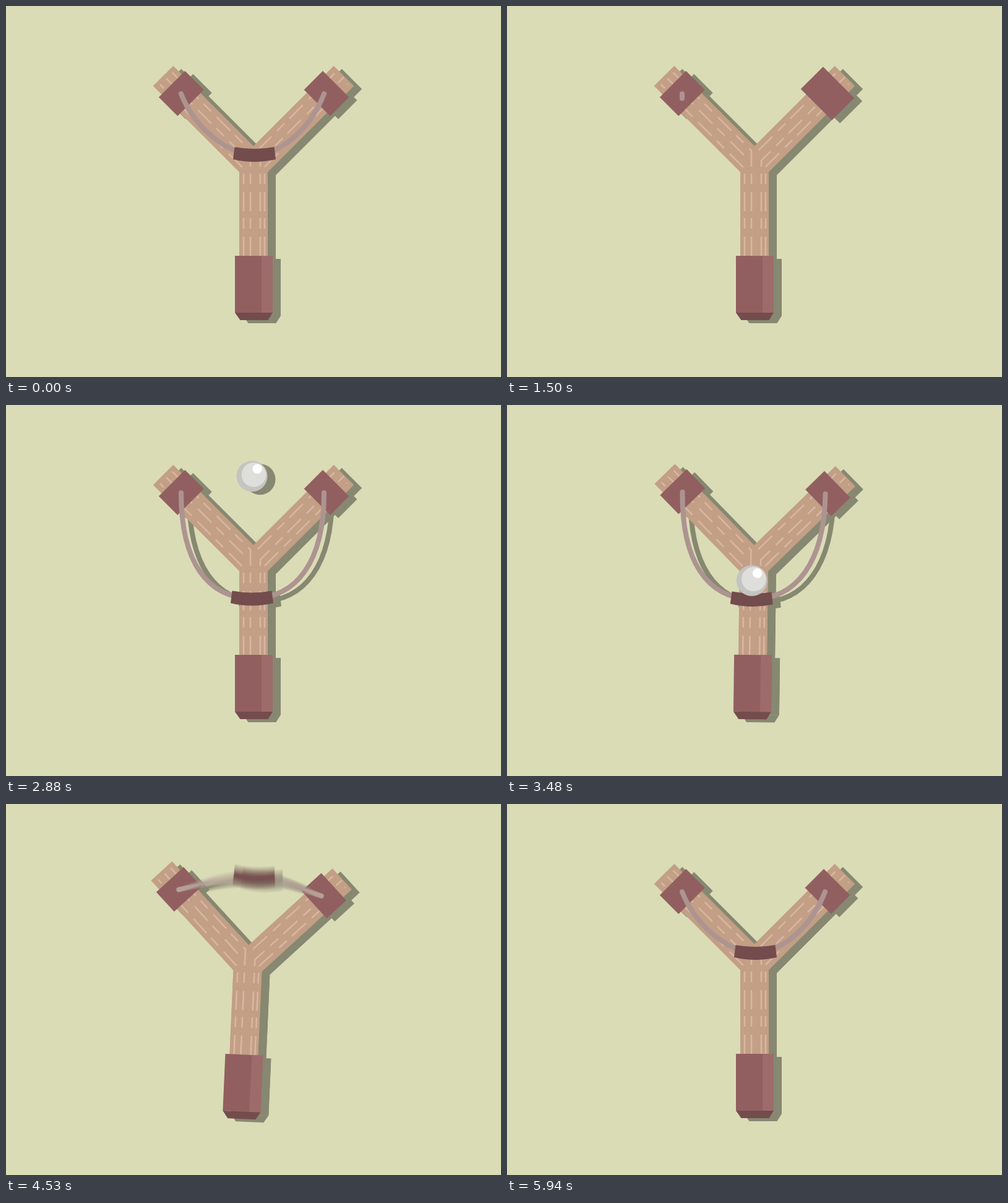
Write an HTML page with a canvas that moves like this. It is 800 px wide and 600 px high and loops after 6.9 s.

```html
<!DOCTYPE html>
<html lang="en">
<head>
<meta charset="utf-8">
<title>Slingshot</title>
<style>
html, body { margin: 0; width: 100%; height: 100%; overflow: hidden; background: #dadcb6; }
canvas { display: block; }
</style>
</head>
<body>
<canvas id="stage" width="800" height="600"></canvas>
<script>
const LOOP = 6900, STEP = 30;
const stage = document.getElementById('stage').getContext('2d');
const rig = layer(), sample = layer(), blur = layer();

const WOOD = '#c29f85', GRAIN = '#d9b6a2', GRIP = '#925f60', GRIP_LIGHT = '#9e6b6b';
const DARK = '#734c4d', BAND = '#ad9490';
const LEFT = [283, 142], RIGHT = [514, 142];

// p: pouch centre; l and r: curve handles at the anchor and at the pouch
const HANG = symmetric([397.5, 312.5], 0, 112, 72);
const FLUNG = symmetric([404, 117], 30, -8, 50);
const REST = symmetric([401.5, 240], 20, 52, 46);
const PULL = { p: [355.5, 448], l: [11, 120, -52, -53], r: [-24, 70, 60, -60] };

// grain lines run up the stem, then bend outwards along an arm
const GRAINS = [
  grain(384, 263, -1, 122, 15),
  grain(395, 234, -1, 127, 80),
  grain(411, 250, 1, 135, 100),
  grain(418, 260, 1, 134, 20),
  grain(383, 241, -1, 125, 182, 241),
  grain(407, 233, 1, 126, 190, 233),
  grain(255, 133, -1, 6, 190, 133)
];

function symmetric(p, hx, hy, px) {
  return { p, l: [hx, hy, -px, 0], r: [-hx, hy, px, 0] };
}

function grain(x, bend, side, reach, delay, foot = 404) {
  return { delay, pts: [[x, foot], [x, bend], [x + side * reach, bend - reach]] };
}

function layer() {
  const c = document.createElement('canvas');
  c.width = 800;
  c.height = 600;
  return c.getContext('2d');
}

const mix = (a, b, u) => a + (b - a) * u;
const span = (t, a, b) => Math.max(0, Math.min(1, (t - a) / (b - a)));
function ease(t, a, b) {
  const u = span(t, a, b);
  return u * u * (3 - 2 * u);
}
const pop = (t, start) => 1.2 * ease(t, start, start + 270) - 0.2 * ease(t, start + 270, start + 470);

function blend(a, b, u) {
  const out = {};
  for (const k in a) out[k] = a[k].map((v, i) => mix(v, b[k][i], u));
  return out;
}

function clear(c) {
  c.setTransform(1, 0, 0, 1, 0, 0);
  c.clearRect(0, 0, 800, 600);
}

function box(c, color, x, y, w, h) {
  c.fillStyle = color;
  c.fillRect(x, y, w, h);
}

function disc(c, color, x, y, r) {
  c.fillStyle = color;
  c.beginPath();
  c.arc(x, y, r, 0, 7);
  c.fill();
}

// draws around its own origin, moved, scaled and turned
function at(c, x, y, s, turn, draw) {
  if (s <= 0) return;
  c.save();
  c.translate(x, y);
  c.scale(s, s);
  c.rotate(turn);
  draw();
  c.restore();
}

// strokes the first len pixels of a polyline
function trace(c, pts, len) {
  if (len <= 0) return;
  c.beginPath();
  c.moveTo(...pts[0]);
  for (let i = 1; i < pts.length && len > 0; i++) {
    const [x, y] = pts[i - 1], [ex, ey] = pts[i];
    const d = Math.hypot(ex - x, ey - y);
    if (!d) continue;
    const u = Math.min(1, len / d);
    c.lineTo(mix(x, ex, u), mix(y, ey, u));
    len -= d;
  }
  c.stroke();
}

function place(c, t) {
  const pull = ease(t, 3415, 3960);
  const turn = pull - ease(t, 4140, 4646);
  const move = pull - ease(t, 4140, 4740);
  c.translate(400 - 39 * move, 300 + 5.4 * move);
  c.rotate(turn * 19 * Math.PI / 180);
  c.translate(-400, -300);
}

function drawFrame(c, t) {
  c.lineCap = 'butt';
  c.strokeStyle = WOOD;
  c.lineWidth = 46;
  for (const [side, start] of [[-1, 412], [1, 471]]) {
    trace(c, [[400, 410], [400, 259], [400 + side * 146, 113]], 357.5 * ease(t, start, start + 600));
  }

  c.strokeStyle = GRAIN;
  c.lineWidth = 2.6;
  c.setLineDash([31, 13, 17, 11]);
  const grown = 460 * ease(t, 480, 1280);
  for (const g of GRAINS) trace(c, g.pts, grown - g.delay);
  c.setLineDash([]);

  const wrap = () => box(c, GRIP, -21.5, -30, 43, 60);
  at(c, 283.3, 141.5, pop(t, 960), Math.PI / 4, wrap);
  at(c, 518, 141.5, pop(t, 1200), -Math.PI / 4, wrap);
  at(c, 400.5, 456, pop(t, 30), 0, () => {
    box(c, GRIP, -30.5, -52, 61, 92);
    box(c, GRIP_LIGHT, 12.5, -52, 18, 92);
    c.fillStyle = DARK;
    c.beginPath();
    c.moveTo(-30.5, 40);
    c.lineTo(30.5, 40);
    c.lineTo(23, 52);
    c.lineTo(-22, 52);
    c.fill();
  });
}

function pose(t) {
  if (t < 4140) return blend(HANG, PULL, ease(t, 3450, 3960));
  if (t >= 4800) return blend(FLUNG, REST, ease(t, 4820, 5040));
  const u = span(t, 4140, 4380);
  const s = blend(PULL, FLUNG, u * u);
  const d = Math.max(0, t - 4380);
  const sway = -40 * Math.sin(d * Math.PI / 50) * Math.exp(-d / 150);
  s.p[1] += sway;
  s.l[1] += sway / 3;
  s.r[1] += sway / 3;
  return s;
}

function strand(c, from, h, p, u) {
  if (u <= 0) return;
  c.setLineDash(u < 1 ? [265 * u, 999] : []);
  c.beginPath();
  c.moveTo(...from);
  c.bezierCurveTo(from[0] + h[0], from[1] + h[1], p[0] + h[2], p[1] + h[3], ...p);
  c.stroke();
  c.setLineDash([]);
}

function drawBall(c, t, p) {
  if (t > 4470) return;
  const flight = Math.max(0, t - 4380);
  const x = p[0] + 0.4 * flight;
  const y = t < 3300 ? mix(77, 282.5, ease(t, 2743, 3240)) : p[1] - 30 - 2.7 * flight;
  at(c, x, y, pop(t, 2226), 0, () => {
    disc(c, '#c4c4c1', 0, 0, 25);
    disc(c, '#dededb', 3, -2.5, 19.8);
    disc(c, '#fff', 8.7, -12, 7.8);
  });
}

function drawSling(c, t) {
  const s = pose(t);
  c.strokeStyle = BAND;
  c.lineWidth = 8;
  c.lineCap = 'round';
  strand(c, LEFT, s.l, s.p, ease(t, 1460, 1860));
  strand(c, RIGHT, s.r, s.p, ease(t, 1520, 1920));
  at(c, ...s.p, pop(t, 1700), 0, () => {
    c.fillStyle = DARK;
    c.beginPath();
    c.moveTo(-32, -12);
    c.quadraticCurveTo(0, -6, 32, -12);
    c.lineTo(34.5, 8);
    c.quadraticCurveTo(0, 16, -34.5, 8);
    c.fill();
  });
  drawBall(c, t, s.p);
}

// averages the fast sling over a short shutter
function drawBlurred(t) {
  const n = 10, shutter = 20;
  clear(blur);
  blur.globalCompositeOperation = 'lighter';
  blur.globalAlpha = 1 / n;
  for (let i = 0; i < n; i++) {
    clear(sample);
    place(sample, t);
    drawSling(sample, t + shutter * ((i + 0.5) / n - 0.5));
    blur.drawImage(sample.canvas, 0, 0);
  }
  rig.setTransform(1, 0, 0, 1, 0, 0);
  rig.drawImage(blur.canvas, 0, 0);
}

function render(now) {
  let t = Math.floor(now % LOOP / STEP) * STEP;
  if (t < STEP) t = LOOP;
  clear(rig);
  place(rig, t);
  drawFrame(rig, t);
  if (t > 4200 && t < 4780) drawBlurred(t);
  else drawSling(rig, t);

  stage.shadowColor = 'transparent';
  box(stage, '#dadcb6', 0, 0, 800, 600);
  stage.shadowColor = 'rgba(0,0,0,.38)';
  stage.shadowOffsetX = 13;
  stage.shadowOffsetY = 5;
  stage.drawImage(rig.canvas, 0, 0);
}

const start = performance.now();
function tick() {
  render(performance.now() - start);
  requestAnimationFrame(tick);
}
tick();
</script>
</body>
</html>
```
